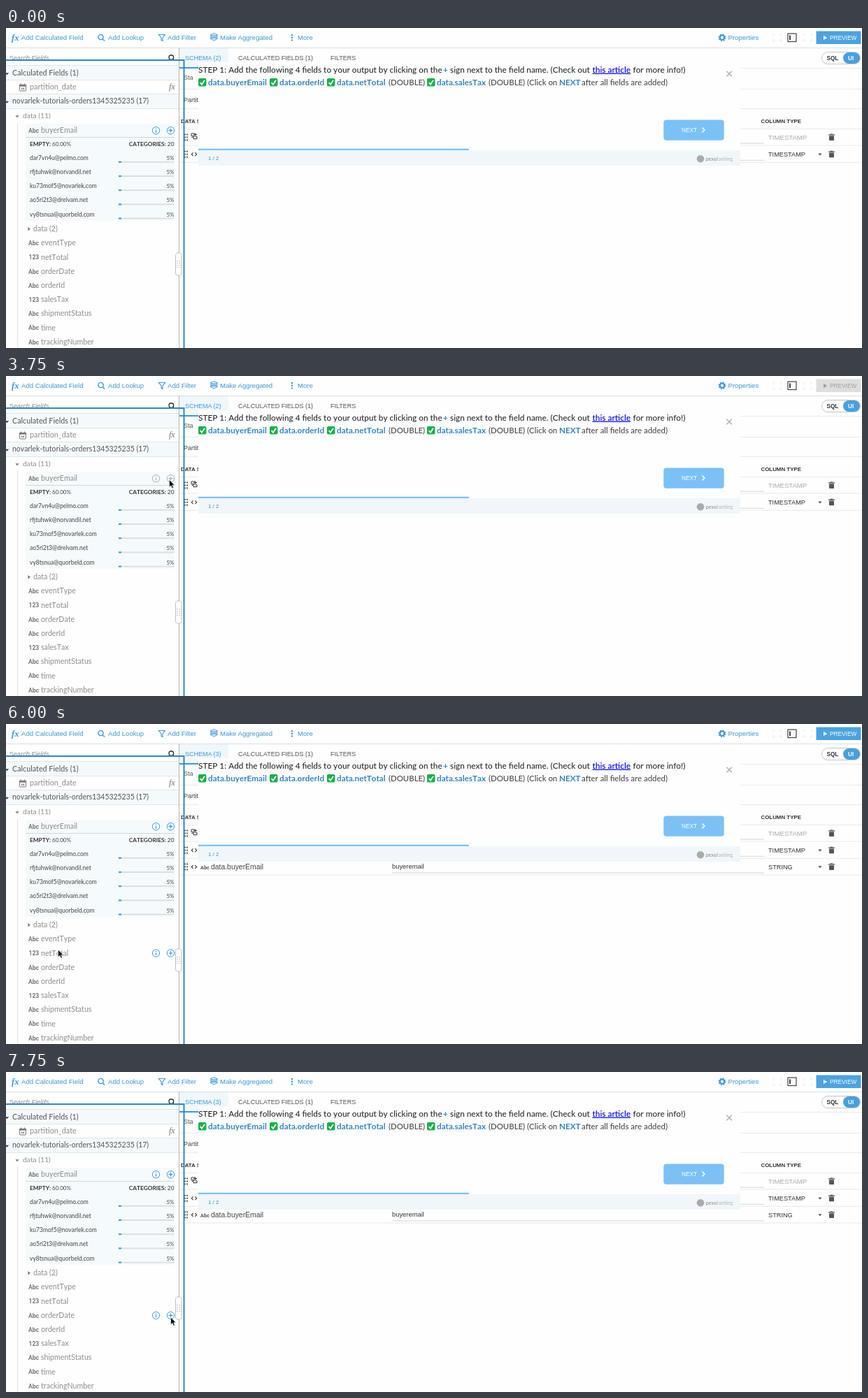
An HTML page for the animation above (8 s loop, 1224 by 458 pixels).

```html
<!DOCTYPE html>
<html lang="en">
<head>
<meta charset="utf-8">
<title>Field picker</title>
<style>
  html, body { margin: 0; width: 100%; height: 100%; overflow: hidden; background: #fefefe; }
  svg { display: block; width: 1224px; height: 458px; }
  text { white-space: pre; }
  .ui { font-family: "Liberation Sans", Arial, sans-serif; }
  .list { font-family: Lato, sans-serif; font-kerning: none; }
  .tag { font-family: Roboto, sans-serif; font-weight: 700; }
  .fx { font-family: "Liberation Serif", serif; font-style: italic; font-weight: 700; }
</style>
</head>
<body>
<svg id="stage" viewBox="0 0 1224 458" xmlns="http://www.w3.org/2000/svg"></svg>
<script>
const BLUE = '#3a98dc', GREY = '#8c8c8c', DARK = '#333', RULE = '#e6e9eb';
const LOOP = 8000;

const text = (x, y, str, size, fill = DARK, font = 'ui', extra = '') =>
  `<text class="${font}" x="${x}" y="${y}" font-size="${size}" fill="${fill}" ${extra}>${str}</text>`;
const rect = (x, y, w, h, fill, extra = '') =>
  `<rect x="${x}" y="${y}" width="${w}" height="${h}" fill="${fill}" ${extra}/>`;
const line = (d, stroke, width = 1, extra = '') =>
  `<path d="${d}" fill="none" stroke="${stroke}" stroke-width="${width}" ${extra}/>`;
const shape = (d, fill) => `<path d="${d}" fill="${fill}"/>`;
const group = (id, body, extra = '') => `<g id="${id}" ${extra}>${body}</g>`;
const bold = 'font-weight="700"', medium = 'font-weight="500"';
const end = 'text-anchor="end"';

const caretDown = (x, y, fill, r = 2.6) => shape(`M${x - r} ${y - r / 2}h${2 * r}l${-r} ${r + 0.4}z`, fill);
const lens = (x, y, r, color) =>
  line(`M${x - r} ${y}a${r} ${r} 0 1 0 ${2 * r} 0a${r} ${r} 0 1 0 ${-2 * r} 0M${x + r * 0.7} ${y + r * 0.7}l3 3`, color, 1.4);

const infoIcon = y => `<g fill="none" stroke="currentColor"><circle cx="214.5" cy="${y}" r="5.2"/>
  <path d="M214.5 ${y - 0.8}v3.6M214.5 ${y - 3}v1.1" stroke-width="1.2"/></g>`;
const plusIcon = y => `<g fill="none" stroke="currentColor"><circle cx="235.5" cy="${y}" r="5.2"/>
  <path d="M232.6 ${y}h5.8M235.5 ${y - 2.9}v5.8" stroke-width="1.2"/></g>`;

function toolbar() {
  const label = (x, str) => text(x, 17.3, str, 9.6, BLUE);
  const corners = x => line(
    `M${x} 12v-3h3M${x + 9} 9h3v3M${x + 12} 16v3h-3M${x + 3} 19h-3v-3`, '#ececec', 1);
  const layers = [10, 12.6, 15.2].map(y => line(`M292 ${y}l5.3 -2.4l5.3 2.4l-5.3 2.6z`, BLUE, 1)).join('');
  return rect(0, 0, 1224, 28, '#fefefe') +
    text(8, 17.5, 'fx', 12.5, BLUE, 'fx') + label(22, 'Add Calculated Field') +
    lens(135.5, 13, 3.6, BLUE) + label(146, 'Add Lookup') +
    line('M218.5 9.5h9l-3.5 4.5v4.5l-2 -1.3v-3.2z', BLUE, 1.1) + label(231, 'Add Filter') +
    layers + label(306, 'Make Aggregated') +
    [10, 13.7, 17.4].map(y => `<circle cx="409" cy="${y}" r="1.2" fill="${BLUE}"/>`).join('') + label(417, 'More') +
    `<circle cx="1024" cy="13.7" r="3.1" fill="none" stroke="${BLUE}" stroke-width="2"/>
     <circle cx="1024" cy="13.7" r="4.7" fill="none" stroke="${BLUE}" stroke-width="1.5" stroke-dasharray="1.85"/>` +
    label(1032.5, 'Properties') + corners(1097) + corners(1140) +
    rect(1118, 8, 12, 11.5, 'none', 'stroke="#444" stroke-width="1.2"') + rect(1120, 10.5, 2, 6.5, '#444') +
    group('preview', rect(1158.5, 4.5, 64, 18.5, 'currentColor') +
      `<g id="previewLabel">${shape('M1169 10.7v6.4l5.4 -3.2z', 'currentColor')}
       ${text(1178, 17, 'PREVIEW', 8.3, 'currentColor')}</g>`);
}

function tableRow(y, type, { muted, column, icon = 'code' } = {}) {
  const grip = [-4, 0, 4].map(d => rect(255, y + d - 1, 1.8, 1.8, '#444') + rect(258.2, y + d - 1, 1.8, 1.8, '#444')).join('');
  const kind = icon === 'code'
    ? line(`M267.7 ${y - 2.4}l-2.4 2.4l2.4 2.4M270.3 ${y - 2.4}l2.4 2.4l-2.4 2.4`, '#333', 1.1)
    : line(`M265 ${y - 5.5}h6v3.5h-6zM268 ${y - 2}v4.2h5v-3h-2M265.5 ${y}h2M268 ${y - 4}h5`, '#333', 1);
  const trash = rect(1177, y - 2.3, 7, 6.8, '#555', 'rx="0.8"') + rect(1176, y - 4.2, 9, 1.3, '#555') +
    rect(1178.7, y - 5.2, 3.6, 1.2, '#555');
  return grip + kind + trash +
    text(1090, y + 3.4, type, muted ? 9.6 : 9.2, muted ? '#aaa' : DARK) +
    (muted ? '' : caretDown(1164, y, '#555')) +
    line(`M552 ${y + 8.5}H1084`, '#d4d4d4') + line(`M248 ${y + 11.5}H1224`, RULE) +
    (column ? text(278, y + 3.4, 'Abc', 7.3, '#555', 'tag') + text(293, y + 3.8, 'data.' + column, 10.4, '#444') +
      text(552, y + 2.6, column.toLowerCase(), 9.4) : '');
}

function main() {
  return rect(248, 28, 70, 29, '#f0f7fb') +
    `<text id="schema" class="ui" x="256" y="46.3" font-size="9" fill="${BLUE}"></text>` +
    text(332, 46.3, 'CALCULATED FIELDS (1)', 9.07, '#555') + text(464, 46.3, 'FILTERS', 9, '#555') +
    line('M0 28.5H1224', '#dcdfe1') + line('M248 57.5H1224M248 87.5H1224M248 115.5H1224M248 144.5H1224', RULE) +
    rect(248, 56, 70, 2, BLUE) +
    rect(1166.5, 34.5, 55, 17, '#fff', 'rx="8.5" stroke="#c4c4c4"') + rect(1197, 35, 24, 16, '#46a0df', 'rx="8"') +
    text(1173.5, 46, 'SQL', 8.2, DARK, 'ui', bold) + text(1204, 46, 'UI', 8.2, '#fff', 'ui', bold) +
    text(254, 74, 'Sta', 9, '#555') + text(254, 106.3, 'Partition', 9, '#444') +
    text(250, 136, 'DATA SOURCE', 7.9, DARK, 'ui', bold) + text(1079.5, 136, 'COLUMN TYPE', 7.9, DARK, 'ui', bold) +
    tableRow(156.5, 'TIMESTAMP', { muted: true, icon: 'copy' }) + tableRow(180.8, 'TIMESTAMP') +
    group('newRow', tableRow(204.5, 'STRING', { column: 'buyerEmail' }));
}

function popup() {
  const say = (x, y, str) => text(x, y, str, 11.8, '#2c2c2c', 'list', medium);
  const note = (x, str) => text(x, 81.5, str, 11.4, '#4c4c4c', 'list', medium);
  const key = (x, str, y = 81.5) => text(x, y, str, 11.7, '#3585c6', 'list', bold);
  const tick = x => rect(x, 72, 11.5, 11.5, '#18b24b', 'rx="2"') +
    line(`M${x + 2.6} 78.2l2.4 2.6l4 -6`, '#fff', 1.7);
  return rect(275, 49, 775, 148, '#fefefe') +
    say(275, 63.7, 'STEP 1: Add the following 4 fields to your output by clicking on the') + key(625, '+', 63.7) +
    say(635, 63.7, 'sign next to the field name. (Check out') +
    text(838.5, 63.7, 'this article', 11.9, '#0000ee', 'list', medium + ' text-decoration="underline"') +
    say(896.5, 63.7, 'for more info!)') +
    [275, 377, 459, 602].map(tick).join('') +
    key(289, 'data.buyerEmail') + key(391, 'data.orderId') + key(473, 'data.netTotal') + note(547, '(DOUBLE)') +
    key(616, 'data.salesTax') + note(690, '(DOUBLE) (Click on') + key(791, 'NEXT') + note(823, 'after all fields are added)') +
    line('M1030.3 61.8l7.6 7.6m0 -7.6l-7.6 7.6', '#b5b5b5', 1.5) +
    rect(940.3, 131.5, 86.4, 29.3, '#7bc1f6', 'rx="4"') + text(966, 149, 'NEXT', 8.3, '#fff') +
    line('M995.5 142.6l3.4 3.5l-3.4 3.5', '#fff', 1.5) +
    rect(275, 175, 775, 22, '#f0f6f9') + rect(275, 172.7, 387, 2.2, '#79bff3') +
    text(289, 189.3, '1 / 2', 7.9, BLUE) +
    '<circle cx="993" cy="187.3" r="5.3" fill="#aaa"/>' +
    text(1000.5, 190.3, '<tspan fill="#888">pexo</tspan>lanting', 7.6, '#b5b5b5', 'list');
}

const rowY = i => 307.7 + i * 20.2;

function sidebar() {
  const item = (y, tag, name) => text(tag === 'Abc' ? 32 : 32.5, y + 3.4, tag, 8.6, '#777', 'tag') +
    text(50, y + 3.6, name, 10.65, GREY, 'list');
  const mails = ['dar7vn4u@pelmo.com', 'rfjtuhwk@norvandil.net', 'ku73mof5@novarlek.com',
    'ao5ri2t3@drelvam.net', 'vy8tsnua@quorbeld.com'];
  const stats = mails.map((mail, i) => {
    const y = 186 + i * 20.2;
    return text(34, y + 2.8, mail, 8.5, '#444', 'list') + text(240.5, y + 2.8, '5%', 8, '#444', 'list', end) +
      rect(161, y + 4.8, 79.5, 2, '#dcdfe1') + rect(161, y + 4.8, 4, 2, BLUE);
  }).join('');
  const fields = ['eventType', 'netTotal', 'orderDate', 'orderId', 'salesTax', 'shipmentStatus', 'time', 'trackingNumber'];
  const numeric = ['netTotal', 'salesTax'];
  const calendar = rect(19.5, 81.5, 9, 8.5, 'none', 'stroke="#777" rx="1"') + rect(19, 81, 10, 2.6, '#777') +
    line('M21.5 79.5v2M26.5 79.5v2', '#777', 1.3) + rect(22, 85.5, 1.4, 2.5, '#777') + rect(24.5, 85.5, 1.6, 2.5, '#777');
  const handleDots = [333, 336, 339, 342].map(y => rect(244.3, y, 1.2, 1.2, '#aaa') + rect(247.6, y, 1.2, 1.2, '#aaa')).join('');
  return rect(0, 29, 247, 429, '#fefefe') +
    text(4.5, 46, 'Search Fields', 9.3, '#888', 'ui', 'font-style="italic"') + lens(236.3, 42, 3.3, '#333') +
    rect(0, 47, 247, 411, '#fefefe') +
    rect(0, 54, 247, 20, '#f4f9fc') + rect(0, 95, 247, 20, '#f4f9fc') +
    line('M0 53.5H247M0 74.5H247M0 94.5H247M0 115.5H247', '#dfe6ea') +
    line('M16.5 136V458', '#e2e2e2') + line('M28.5 137V276', '#e8edf0') +
    rect(28, 137, 213, 139, '#f5fafc') + line('M28 156.5H241', '#cfd8dd') +
    caretDown(1.5, 65.5, '#444') + text(9, 68, 'Calculated Fields (1)', 10.75, '#555', 'list') +
    calendar + text(34, 88.4, 'partition_date', 10.8, GREY, 'list') + text(233, 88, 'fx', 12, '#777', 'fx', 'style="font-weight:400"') +
    caretDown(1.5, 106, '#444') + text(9, 108.4, 'novarlek-tutorials-orders1345325235 (17)', 10.45, '#555', 'list') +
    caretDown(16, 126.5, '#777') + text(24, 129, 'data (11)', 10.3, GREY, 'list') +
    item(146.2, 'Abc', 'buyerEmail') +
    text(34, 169.2, 'EMPTY:', 8.3, DARK, 'list', bold) + text(66, 169.2, '60.00%', 8, '#444', 'list') +
    text(240.5, 169.2, '<tspan font-weight="700">CATEGORIES:</tspan> 20', 8.3, DARK, 'list', end) + stats +
    shape('M31.5 284.8v5.8l3.2 -2.9z', '#777') + text(39, 291, 'data (2)', 10.6, GREY, 'list') +
    fields.map((name, i) => item(rowY(i), numeric.includes(name) ? '123' : 'Abc', name)).join('') +
    group('info', infoIcon(146.7)) + group('plus', plusIcon(146.7)) +
    group('netTotalHover', infoIcon(328) + plusIcon(328), `color="${BLUE}"`) +
    group('orderDateHover', infoIcon(348.4) + plusIcon(348.4), `color="${BLUE}"`) +
    line('M247.5 28V458', '#b4b4b4') + line('M0 46H254.5V458', '#2f86c8', 2) +
    rect(242.5, 321.5, 8.5, 33, '#fff', 'rx="4.2" stroke="#bbb"') + handleDots;
}

const stage = document.getElementById('stage');
stage.innerHTML = main() + toolbar() + sidebar() + popup() +
  group('cursor', '<path d="M0 0V10.6L2.4 8.4L4.1 12.2L5.9 11.4L4.3 7.7H7.6Z" fill="#111" stroke="#fff" stroke-width="0.6"/>');
const el = id => document.getElementById(id);

// Pointer stops: [time, x, y]
const stops = [
  [500, 272, 224], [1000, 236, 159], [1250, 226, 146], [1500, 226.5, 144], [1750, 231, 146], [2500, 233.5, 148.5],
  [5250, 233.5, 160], [5500, 147.5, 324.5], [5750, 98, 331.5], [6000, 74.5, 323], [6250, 70.5, 323],
  [6500, 124.5, 318.5], [6750, 201.5, 337.5], [7000, 218.5, 338], [7250, 234, 342.5], [7750, 235.5, 351]
];

function draw(t) {
  const during = (from, to = LOOP) => t >= from && t < to;
  const show = (id, on) => el(id).setAttribute('visibility', on ? 'visible' : 'hidden');
  const tint = (id, color) => el(id).setAttribute('color', color);

  const stop = stops.filter(([time]) => time <= t).pop();
  show('cursor', stop);
  if (stop) el('cursor').setAttribute('transform', `translate(${stop[1]} ${stop[2]})`);

  tint('info', during(3250, 4250) ? '#aaa' : BLUE);
  tint('plus', during(3250, 5000) ? '#aaa' : BLUE);
  const busy = during(3750, 5000);
  tint('preview', busy ? '#dedede' : '#4ba3e0');
  tint('previewLabel', busy ? '#a0a0a0' : '#fff');

  const added = during(4250);
  show('newRow', added);
  el('schema').textContent = `SCHEMA (${added ? 3 : 2})`;
  show('netTotalHover', during(5500, 7250));
  show('orderDateHover', during(7250));
}

function tick() {
  draw(performance.now() % LOOP);
  requestAnimationFrame(tick);
}
tick();
</script>
</body>
</html>
```
